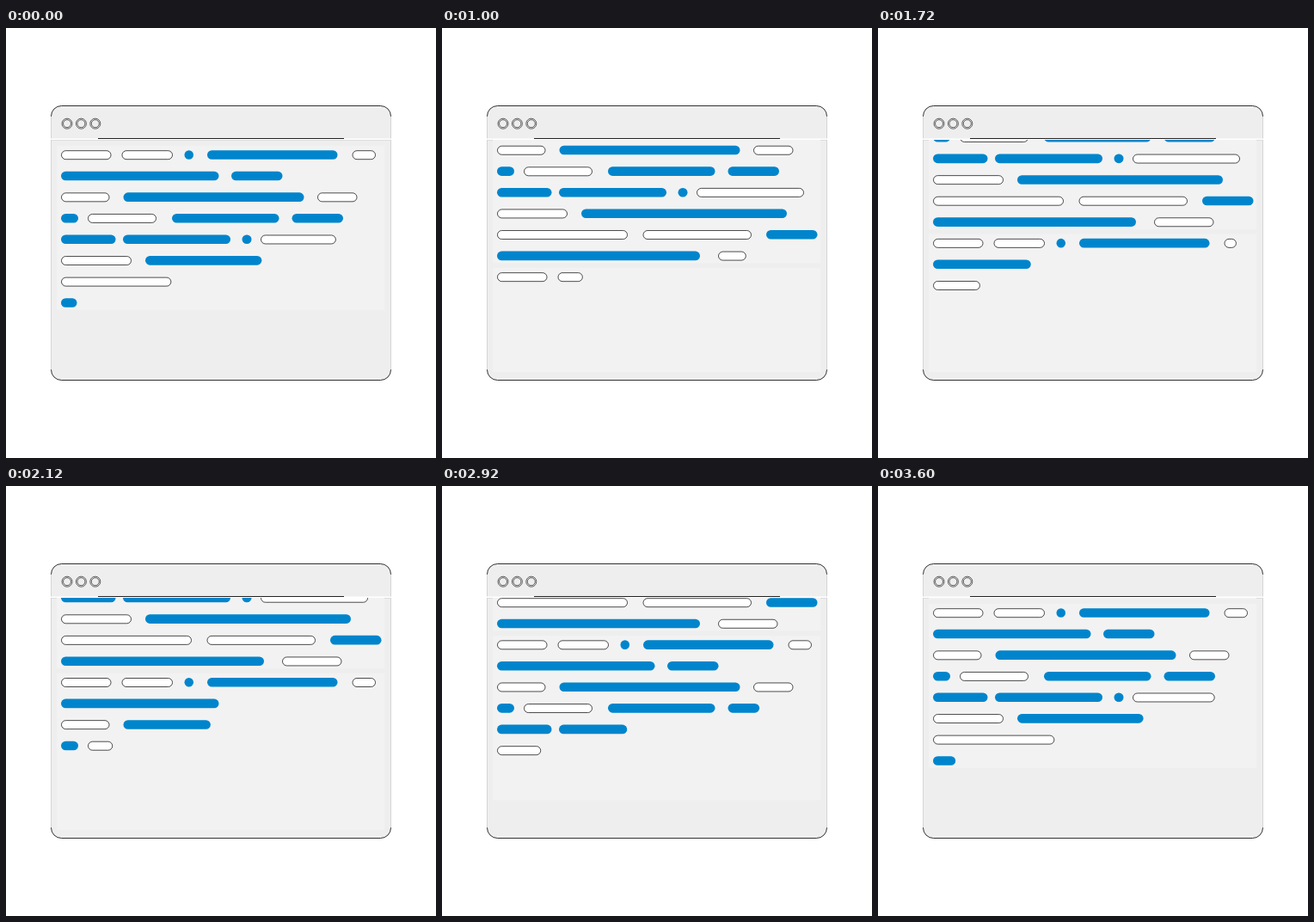
Recreate the animation shown at these times as an HTML page with a canvas. Size 500x500 px, loop 3640 ms.

```html
<!DOCTYPE html>
<html lang="en">
<head>
<meta charset="utf-8">
<title>Typing code window</title>
<style>
  html, body { margin: 0; width: 100%; height: 100%; overflow: hidden; background: #fff; }
  canvas { display: block; }
</style>
</head>
<body>
<canvas width="500" height="500"></canvas>
<script>
const ctx = document.querySelector('canvas').getContext('2d');
const LOOP = 3640, STEP = 40, TYPING_PERIOD = 3560;
const FIRST_START = 640, STAGGER = 400;
const LEFT = 64, PITCH = 24.57, BLOCK = PITCH * 8, SPEED = BLOCK / 3600;
const BLUE = '#0085cc', INK = '#000', GREY = '#eee';

const blue = (x, w) => ({ x, w, solid: true });
const white = (x, w) => ({ x, w });
const row = (duration, ...bars) => ({ duration, bars });

const rows = [
  row(1150, white(64, 58.5), white(134.5, 59.5), blue(207.5, 10.5), blue(234, 151.5), white(402.5, 27.5)),
  row(1500, blue(64, 183.5), blue(262, 59.5)),
  row(1350, white(64, 56.5), blue(136.5, 210), white(362, 46.5)),
  row(1210, blue(64, 20), white(95, 80), blue(193, 124.5), blue(332.5, 59.5)),
  row(1550, blue(64, 63.5), blue(136, 125), blue(274.5, 11), white(296, 125)),
  row(1400, white(64, 82), blue(162, 239)),
  row(1390, white(64, 152), white(233.5, 126.5), blue(377, 59.5)),
  row(1330, blue(64, 236), white(321, 69.5))
];

// Halfway between linear and smoothstep
function ease(u) {
  u = Math.max(0, Math.min(1, u));
  return (u + u * u * (3 - 2 * u)) / 2;
}

function roundBox(x, y, w, h, r, fill, line) {
  ctx.beginPath();
  ctx.roundRect(x, y, w, h, r);
  ctx.fillStyle = fill;
  ctx.fill();
  if (line) strokeInk(line);
}

function strokeInk(line) {
  ctx.strokeStyle = INK;
  ctx.lineWidth = line;
  ctx.stroke();
}

function fillBox(color, x, y, w, h) {
  ctx.fillStyle = color;
  ctx.fillRect(x, y, w, h);
}

function drawBar(x, y, w, solid) {
  if (w < 1.5) return;
  if (solid) roundBox(x, y - 5.3, w, 10.6, 5.3, BLUE);
  else roundBox(x + .5, y - 4.8, w - 1, 10, 5, '#fff', .7);
}

function drawBlock(top, t) {
  if (t < FIRST_START) return;
  fillBox('#f2f2f2', 59, top - 10.5, 381, 191);
  rows.forEach(({ duration, bars }, i) => {
    const last = bars.at(-1);
    const progress = ease((t - FIRST_START - i * STAGGER) / duration);
    const cursor = LEFT + progress * (last.x + last.w - LEFT);
    for (const { x, w, solid } of bars) {
      drawBar(x, top + i * PITCH, Math.min(w, cursor - x), solid);
    }
  });
}

function drawWindow() {
  roundBox(52.5, 90.5, 395, 319, 12, GREY, .8);
  for (const x of [52, 447]) fillBox('#d4d4d4', x, 103, 1, 294);
  for (const x of [71, 87.4, 103.8]) {
    for (const r of [6, 4.5]) {
      ctx.beginPath();
      ctx.arc(x, 111.2, r, 0, Math.PI * 2);
      strokeInk(.6);
    }
  }
  fillBox('#fff', 52, 128.5, 396, 1.5);
  fillBox('#ddd', 53, 130, 394, 1);
  fillBox('#222', 107, 128, 286, 1);
}

function draw(t) {
  ctx.clearRect(0, 0, 500, 500);
  drawWindow();
  ctx.save();
  ctx.beginPath();
  ctx.rect(53, 130, 394, 270);
  ctx.clip();
  const top = 147.5 - t * SPEED;
  drawBlock(top, t + TYPING_PERIOD);
  drawBlock(top + BLOCK, t);
  ctx.restore();
}

function tick() {
  const t = performance.now() % LOOP;
  draw(Math.floor(t / STEP) * STEP);
  requestAnimationFrame(tick);
}
tick();
</script>
</body>
</html>
```
